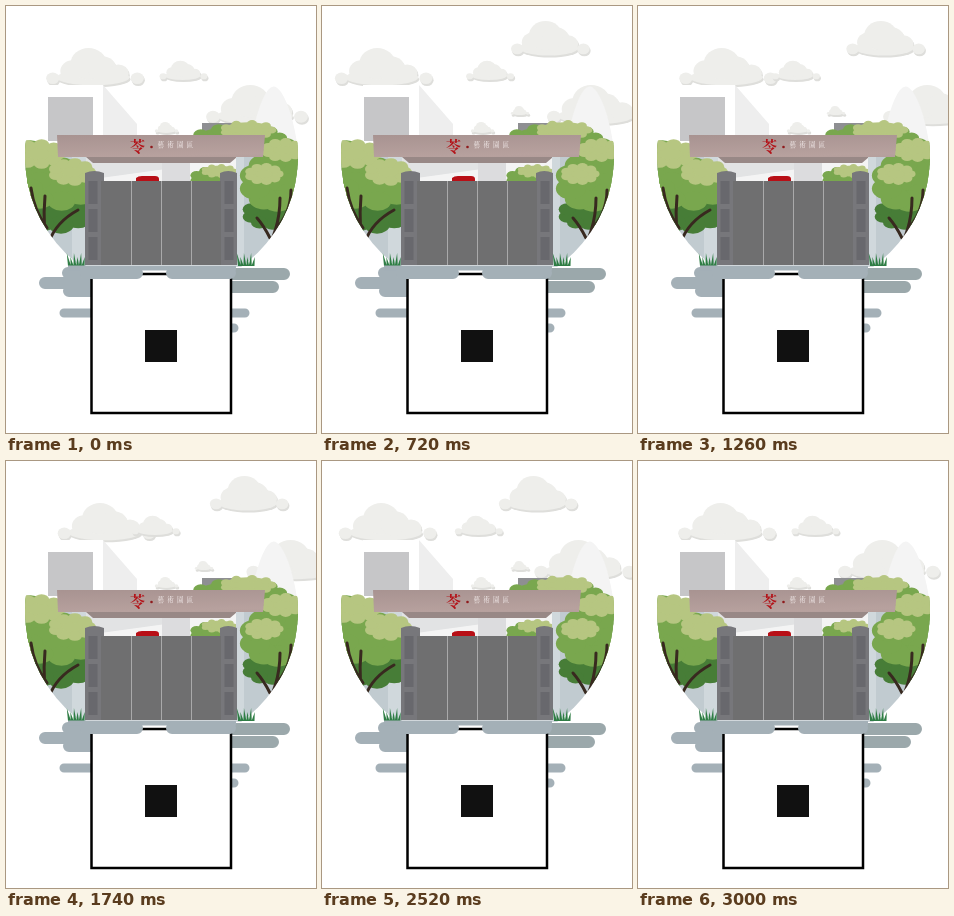
Animation of 310 by 427 pixels, one loop 3.06 s. Source, as an HTML page:

```html
<!DOCTYPE html>
<html lang="zh">
<head>
<meta charset="utf-8">
<style>
html, body { margin: 0; width: 100%; height: 100%; overflow: hidden; background: #fff; }
svg { display: block; width: 310px; height: 427px; }
text { font-family: "Noto Serif CJK SC", "Noto Sans CJK SC", "Noto Sans CJK", sans-serif; }
.light { fill: #b6c681; } .mid { fill: #79a74e; } .dark { fill: #477d37; }
.trunk { fill: none; stroke: #38291f; stroke-width: 3; stroke-linecap: round; }
.water { fill: none; stroke: #a4b0b7; stroke-width: 12; stroke-linecap: round; }
</style>
</head>
<body>
<svg viewBox="0 0 310 427">
  <defs>
    <clipPath id="round"><circle cx="155.5" cy="150" r="136.5"/></clipPath>
    <linearGradient id="beam" x2=".25" y2="1" spreadMethod="reflect">
      <stop stop-color="#a89391"/><stop offset="1" stop-color="#b7a19e"/>
    </linearGradient>
  </defs>

  <g id="sky"></g>

  <g clip-path="url(#round)">
    <!-- hill and far buildings -->
    <path d="M242 150Q251 98 262 84Q268 76 275 86Q287 104 293 150Z" fill="#f4f4f4"/>
    <path d="M41 79H97V150H41Z" fill="#fff"/>
    <path d="M97 79L131 118V132H97Z" fill="#eee"/>
    <path d="M42 91H87V135H42Z" fill="#c6c6c8"/>
    <path d="M196 117H231L236 130H196Z" fill="#8e8f92"/>
    <g id="treetop"></g>

    <!-- courtyard -->
    <path d="M80 150H230V176H80Z" fill="#f4f4f4"/>
    <path d="M80 151H160V163L80 174Z" fill="#e2e3e4"/>
    <path d="M156 157H184V175H156Z" fill="#dcdcde"/>
    <g id="bush"></g>
    <path d="M80 151H231L224 157H87Z" fill="#988886"/>
    <path d="M130 175V172Q132 170 136 170H149Q153 170 153 173V175Z" fill="#b80f16"/>

    <!-- walls and pillars -->
    <path d="M19 150H80V261H19ZM230 150H292V261H230Z" fill="#c1cbd0"/>
    <path d="M66 150H80V261H66ZM230 150H238V261H230Z" fill="#d0d8dc"/>
    <g id="trees"></g>
    <path class="trunk" d="M43 254Q36 222 39 190M41 222Q28 205 25 182M43 236Q50 216 72 204M256 252Q274 225 274 192M269 224Q285 207 285 184M264 232Q258 220 251 212"/>
  </g>

  <!-- gate -->
  <path d="M79 167Q88 163 98 167V259H79ZM214 167Q222 163 231 167V259H214Z" fill="#77777b"/>
  <path d="M87 175V254M223 175V254" stroke="#68686d" stroke-width="9" stroke-dasharray="23 5"/>
  <path d="M95 175H215V259H95Z" fill="#6f6f70"/>
  <path d="M125.5 175V259M155.5 175V259M185.5 175V259" stroke="#a9a9aa"/>
  <path id="grass" fill="#2f7d45"/>

  <!-- sign beam -->
  <path d="M51 129H259L257 151H52Z" fill="url(#beam)"/>
  <text x="124" y="146" font-size="15" font-weight="900" fill="#b31218">苓</text>
  <circle cx="145.5" cy="141" r="1.3" fill="#8f1a1c"/>
  <text x="151.5" y="141" font-size="6.5" letter-spacing="3.2" fill="#f5eeee">藝術園區</text>

  <!-- water and panel -->
  <path class="water" d="M62 267H120M39 277H90M63 285H90"/>
  <path class="water" d="M200 268H278M220 281H267" style="stroke: #9ba8ab"/>
  <path class="water" d="M58 307H90M220 307H239M220 322H228" style="stroke-width: 9px"/>
  <path d="M85.5 268H225V407H85.5Z" fill="#fff" stroke="#000" stroke-width="2.5"/>
  <path class="water" d="M62 266H230" style="stroke-width: 5px; stroke-linecap: butt; stroke-dashoffset: 0" transform="translate(0 -4)"/>
  <path class="water" d="M80 267H131M166 267H224"/>
  <path d="M139 324H171V356H139Z" fill="#111"/>
</svg>
<script>
const LOOP = 3060, STEP = 60;
const $ = id => document.getElementById(id);
const ellipse = (x, y, rx, ry) => `<ellipse cx="${x}" cy="${y}" rx="${rx}" ry="${ry}"/>`;

// A leafy ellipse with a scalloped rim
function clump(tone, x, y, rx, ry) {
  const lobe = Math.min(rx, ry) * .36;
  let out = ellipse(x, y, rx - lobe * .6, ry - lobe * .6);
  for (let i = 0; i < 9; i++) {
    const a = i / 9 * 2 * Math.PI;
    out += ellipse(x + Math.cos(a) * (rx - lobe), y + Math.sin(a) * (ry - lobe), lobe * 1.4, lobe);
  }
  return `<g class="${tone}">${out}</g>`;
}

$('treetop').innerHTML = clump('mid', 233, 132, 46, 15) + clump('light', 242, 124, 27, 10);
$('bush').innerHTML = clump('mid', 209, 172, 24, 12) + clump('light', 213, 165, 17, 7);
$('trees').innerHTML =
  clump('dark', 50, 203, 38, 25) + clump('mid', 50, 178, 42, 27) + clump('mid', 22, 162, 24, 28) +
  clump('light', 32, 148, 26, 15) + clump('light', 66, 166, 22, 14) +
  clump('dark', 263, 207, 25, 17) + clump('mid', 268, 176, 31, 30) + clump('mid', 278, 150, 22, 18) +
  clump('light', 277, 144, 20, 12) + clump('light', 258, 168, 18, 11);

let blades = '';
for (const left of [62, 232])
  for (let i = 0; i < 6; i++) {
    const x = left + i * 2.7;
    blades += `M${x} 260L${x + (i - 2.5) * .9 + 1} ${247 + i % 2 * 4}L${x + 3} 260Z`;
  }
$('grass').setAttribute('d', blades);

// Puffs rise to a peak and taper off to the right
function puffs(w, h, peak) {
  let out = ellipse(w * .48, h * .72, w * .38, h * .19);
  for (let i = 0; i < 6; i++) {
    const u = i / 5;
    const hump = u < peak ? u / peak : (1 - u) / (1 - peak);
    const r = h * (.14 + .24 * hump);
    out += ellipse(r + u * (w - 2 * r), h * .6 * (1 - hump) + r, r * 1.15, r);
  }
  return out;
}

// keys: turning points as [time, x]
const clouds = [
  { y: 79, size: [100, 43, .4], keys: [[0, 201], [1400, 249], [3000, 201]] },
  { y: 42, size: [96, 41, .4], keys: [[0, 41], [900, 9], [1530, 65], [2300, 9], [3000, 41]] },
  { y: 54, size: [47, 22, .42], keys: [[0, 154], [2200, 121], [3000, 154]] },
  { y: 14, size: [77, 39, .42], keys: [[0, 166], [1400, 212], [3000, 166]], fades: true },
  { y: 100, size: [18, 10, .4], keys: [[0, 189]], fades: true },
  { y: 116, size: [23, 12, .4], keys: [[0, 149]] }
];

for (const c of clouds) {
  const shape = puffs(...c.size);
  c.node = document.createElementNS('http://www.w3.org/2000/svg', 'g');
  c.node.innerHTML = `<g fill="#dededb" transform="translate(1 2)">${shape}</g><g fill="#eeeeeb">${shape}</g>`;
  $('sky').append(c.node);
}

// Half linear, half sine, so the turns are soft but brief
const ease = u => (u + .5 - .5 * Math.cos(Math.PI * u)) / 2;

function follow(keys, t) {
  const next = keys.findIndex(k => k[0] > t);
  if (next < 1) return keys[keys.length - 1][1];
  const [t0, x0] = keys[next - 1], [t1, x1] = keys[next];
  return x0 + (x1 - x0) * ease((t - t0) / (t1 - t0));
}

function draw(now) {
  const t = Math.floor(now % LOOP / STEP) * STEP;
  for (const c of clouds) {
    c.node.setAttribute('transform', `translate(${follow(c.keys, t).toFixed(2)} ${c.y})`);
    if (c.fades) c.node.setAttribute('opacity', Math.max(0, Math.min(1, t / 300, (3000 - t) / 300)));
  }
  requestAnimationFrame(draw);
}
draw(0);
</script>
</body>
</html>
```
